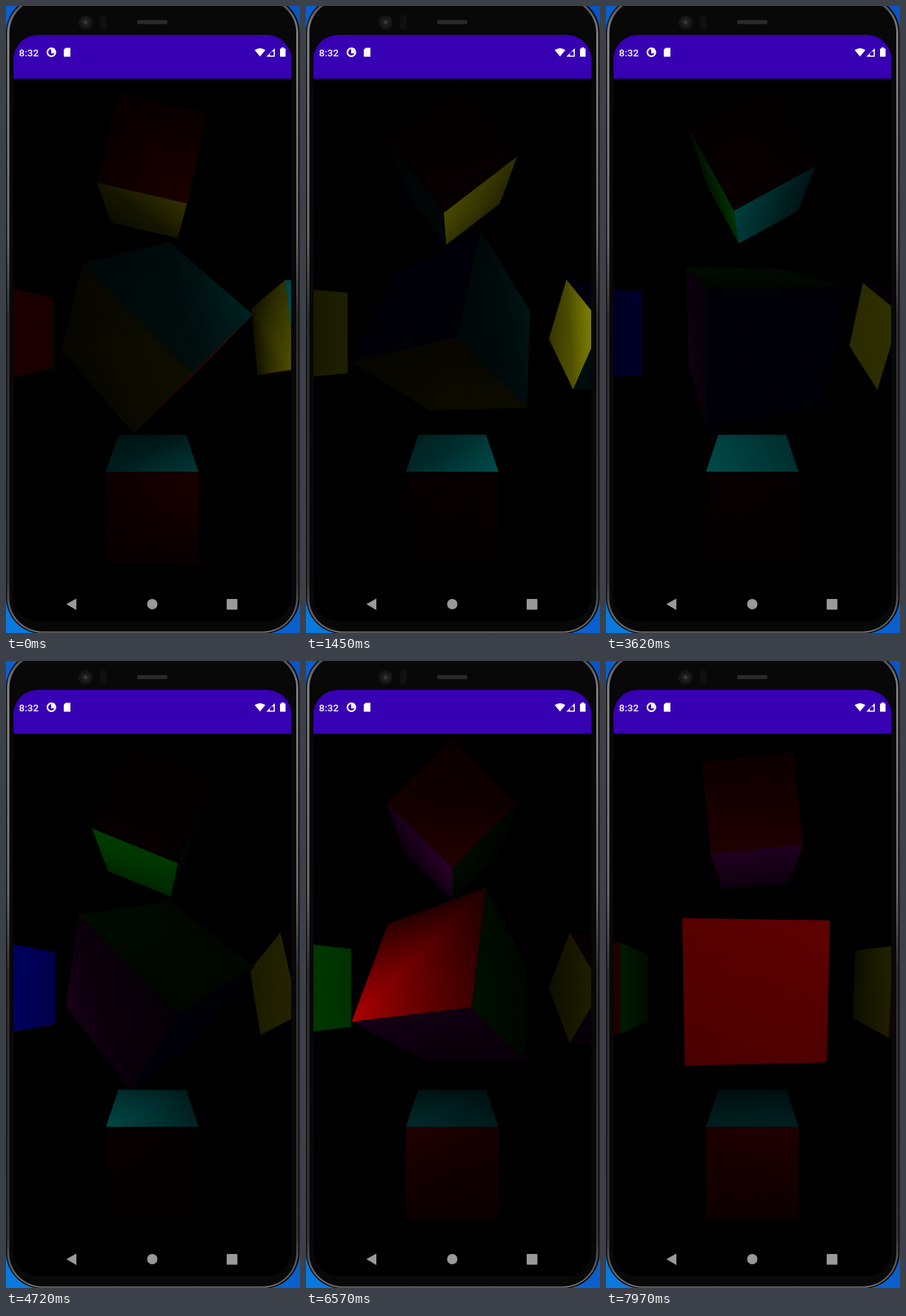
These frames come from a looping animation (397x847 px, 8.05 s). An HTML page with a canvas:

```html
<!DOCTYPE html>
<html lang="en">
<head>
<meta charset="utf-8">
<title>Lit cubes</title>
<style>
  html, body { margin: 0; width: 100%; height: 100%; overflow: hidden; background: #0a5ccc; }
  svg, canvas { position: absolute; display: block; }
  svg { left: 0; top: 0; }
  canvas { left: 10px; top: 98px; }
  text { font: 500 13.5px Roboto, sans-serif; fill: #fff; }
</style>
</head>
<body>
<svg width="397" height="847" viewBox="0 0 397 847">
  <defs>
    <linearGradient id="sky" x1="0" y1="1" x2="1" y2="0">
      <stop offset="0" stop-color="#0b7add"/>
      <stop offset=".6" stop-color="#0a5acb"/>
      <stop offset="1" stop-color="#0a54c4"/>
    </linearGradient>
    <linearGradient id="rim" x1="0" y1="0" x2="0" y2="1">
      <stop offset="0" stop-color="#444"/>
      <stop offset=".06" stop-color="#8a8a8a"/>
      <stop offset=".38" stop-color="#6c6c6c"/>
      <stop offset=".5" stop-color="#333"/>
      <stop offset=".92" stop-color="#3a3a3a"/>
      <stop offset="1" stop-color="#777"/>
    </linearGradient>
    <clipPath id="screen"><rect x="10" y="39.1" width="375.3" height="792" rx="33"/></clipPath>
  </defs>
  <rect width="397" height="847" fill="url(#sky)"/>
  <rect x="0" y="-13" width="396.5" height="861" rx="49" fill="#0c0c0d"/>
  <rect x="1.5" y="-11.5" width="393" height="858" rx="47.5" fill="url(#rim)"/>
  <rect x="4.5" y="-8.5" width="387.5" height="853.5" rx="45" fill="#080809"/>
  <circle cx="107.5" cy="22" r="9.5" fill="#151516"/>
  <circle cx="107.5" cy="22" r="6" fill="#1e1e20"/>
  <circle cx="107.5" cy="22" r="2.5" fill="#38383a"/>
  <rect x="127" y="12" width="9" height="20" rx="4.5" fill="#101011"/>
  <rect x="177" y="19" width="41" height="5.5" rx="2.5" fill="#2a2a2b"/>
  <g clip-path="url(#screen)">
    <rect x="10" y="39" width="376" height="793"/>
    <rect x="10" y="39" width="376" height="59.2" fill="#3700b3"/>
  </g>
  <text x="17.5" y="68">8:32</text>
  <g fill="#fff">
    <circle cx="61.3" cy="62.5" r="5.4" fill="none" stroke="#fff" stroke-width="2.2"/>
    <path d="M61 57H65.5V64H61Z"/>
    <path d="M80.5 56.5H87V68.5H78V59Z"/>
    <path d="M335.8 59.5Q343 54.5 350.2 59.5L343 68.3Z"/>
    <path d="M363 57V68.5H351.5Z"/>
    <path d="M370 57.5H372V56H375.5V57.5H377.5V68.5H370Z"/>
  </g>
  <path d="M359 61.5H361.5V67H356.5V64Z" fill="#3700b3"/>
  <g fill="#999">
    <path d="M81.5 808L95 800.5V816Z"/>
    <circle cx="197.5" cy="808" r="7"/>
    <rect x="298" y="801" width="14.5" height="14.5" rx="1"/>
  </g>
</svg>
<canvas id="view" width="375" height="687"></canvas>
<script>
const ctx = document.getElementById('view').getContext('2d');
const LOOP = 8050, STEP = 77.38, STEP_LEAD = 17;
const START_ANGLE = 77.1, STEP_ANGLE = 2.801;
const SCALE = 343.6, CX = 187.5, CY = 343.8, EYE_Z = -0.5;
const DETAIL = 2;

const add = (a, b, k = 1) => a.map((v, i) => v + k * b[i]);
const dot = (a, b) => a[0] * b[0] + a[1] * b[1] + a[2] * b[2];
const cross = (a, b) => [
  a[1] * b[2] - a[2] * b[1],
  a[2] * b[0] - a[0] * b[2],
  a[0] * b[1] - a[1] * b[0]
];

// normal, up direction and colour channels of each side
const faces = [
  { n: [0, 0, 1], up: [0, 1, 0], rgb: [1, 0, 0] },
  { n: [1, 0, 0], up: [0, 1, 0], rgb: [0, 1, 0] },
  { n: [0, 0, -1], up: [0, 1, 0], rgb: [0, 0, 1] },
  { n: [-1, 0, 0], up: [0, 1, 0], rgb: [1, 1, 0] },
  { n: [0, 1, 0], up: [0, 0, -1], rgb: [0, 1, 1] },
  { n: [0, -1, 0], up: [0, 0, -1], rgb: [1, 0, 1] }
];

const cubes = [
  { pos: [4, 0, -7], axis: [1, 0, 0] },
  { pos: [-4, 0, -7], axis: [0, 1, 0] },
  { pos: [0, 4, -7], axis: [0, 0, 1] },
  { pos: [0, -4, -7], axis: null },
  { pos: [0, 0, -5], axis: [Math.SQRT1_2, Math.SQRT1_2, 0] }
];

function rotate(v, axis, angle) {
  if (!axis) return v;
  const c = Math.cos(angle), s = Math.sin(angle);
  const w = cross(axis, v), k = dot(axis, v) * (1 - c);
  return v.map((x, i) => x * c + w[i] * s + axis[i] * k);
}

function project([x, y, z]) {
  const k = SCALE / (EYE_Z - z);
  return [CX + x * k, CY - y * k];
}

function brightness(point, normal, light) {
  const ray = add(light, point, -1), d2 = dot(ray, ray);
  return Math.max(dot(normal, ray) / Math.sqrt(d2), 0.1) / (1 + 0.25 * d2);
}

function trace(points) {
  ctx.beginPath();
  points.forEach(([x, y]) => ctx.lineTo(x, y));
  ctx.closePath();
}

const shade = (rgb, level) => `rgb(${rgb.map(c => c * level * 255).join(',')})`;

// linear gradient that meets the level of all three corners
function trianglePaint(p, levels, rgb) {
  const [x1, y1] = add(p[1], p[0], -1), [x2, y2] = add(p[2], p[0], -1);
  const d1 = levels[1] - levels[0], d2 = levels[2] - levels[0];
  const area = x1 * y2 - x2 * y1;
  const g = [(d1 * y2 - d2 * y1) / area, (x1 * d2 - x2 * d1) / area];
  const g2 = g[0] * g[0] + g[1] * g[1];
  const lo = Math.min(...levels), hi = Math.max(...levels);
  if (Math.abs(area) < 0.01 || hi - lo < 0.002) return shade(rgb, (lo + hi) / 2);
  const from = add(p[0], g, (lo - levels[0]) / g2);
  const to = add(p[0], g, (hi - levels[0]) / g2);
  const paint = ctx.createLinearGradient(...from, ...to);
  paint.addColorStop(0, shade(rgb, lo));
  paint.addColorStop(1, shade(rgb, hi));
  return paint;
}

// corners are [x, y, z, level]; splitting in space keeps the perspective
function drawTriangle(a, b, c, rgb, depth) {
  if (depth) {
    const mid = (u, v) => u.map((x, i) => (x + v[i]) / 2);
    const ab = mid(a, b), bc = mid(b, c), ca = mid(c, a);
    for (const t of [[a, ab, ca], [ab, b, bc], [ca, bc, c], [ab, bc, ca]]) {
      drawTriangle(...t, rgb, depth - 1);
    }
    return;
  }
  const corners = [a, b, c], p = corners.map(project);
  ctx.fillStyle = ctx.strokeStyle = trianglePaint(p, corners.map(v => v[3]), rgb);
  trace(p);
  ctx.fill();
  ctx.stroke();
}

function drawCube({ pos, axis }, angle, light) {
  for (const face of faces) {
    const n = rotate(face.n, axis, angle), up = rotate(face.up, axis, angle);
    const right = cross(up, n), center = add(pos, n);
    if (dot(n, add(center, [0, 0, EYE_Z], -1)) >= 0) continue;
    const corner = (sx, sy) => {
      const p = add(add(center, right, sx), up, sy);
      return [...p, brightness(p, n, light)];
    };
    const tl = corner(-1, 1), bl = corner(-1, -1), br = corner(1, -1), tr = corner(1, 1);
    ctx.save();
    trace([tl, bl, br, tr].map(project));
    ctx.clip();
    drawTriangle(tl, bl, tr, face.rgb, DETAIL);
    drawTriangle(bl, br, tr, face.rgb, DETAIL);
    ctx.restore();
  }
}

function render(time) {
  const step = Math.min(103, Math.floor((time + STEP_LEAD) / STEP));
  const angle = (START_ANGLE + STEP_ANGLE * step) * Math.PI / 180;
  const light = [2 * Math.sin(angle), 0, -5 + 2 * Math.cos(angle)];
  ctx.clearRect(0, 0, 375, 687);
  ctx.lineWidth = 0.8;
  ctx.lineJoin = 'round';
  cubes.forEach(cube => drawCube(cube, angle, light));
}

const start = performance.now();
function tick() {
  render((performance.now() - start) % LOOP);
  requestAnimationFrame(tick);
}
tick();
</script>
</body>
</html>
```
